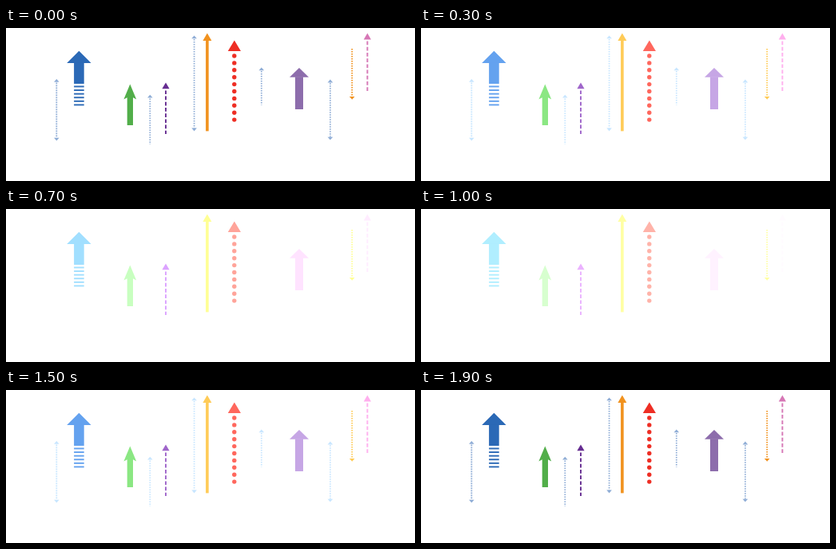
Write an HTML page with a canvas that moves like this. It is 512x192 px and loops after 2 s.

```html
<!DOCTYPE html>
<html lang="en">
<head>
<meta charset="utf-8">
<title>Glowing arrows</title>
<style>
  html, body { margin: 0; width: 100%; height: 100%; overflow: hidden; background: #fff; }
  canvas { display: block; }
</style>
</head>
<body>
<canvas id="stage" width="512" height="192"></canvas>
<script>
const ctx = document.getElementById('stage').getContext('2d');

const STEP = 100, STEPS = 20, PEAK = 9;
const BLUE = [43, 105, 182], SKY = [143, 173, 214], GREEN = [82, 174, 74],
      VIOLET = [102, 45, 145], ORANGE = [241, 146, 30], RED = [238, 46, 36],
      MAUVE = [141, 109, 172], PINK = [214, 118, 181];

let lift = 0;

function setColor(base) {
  const color = `rgb(${base.map(c => Math.min(255, Math.round(c + lift)))})`;
  ctx.fillStyle = ctx.strokeStyle = color;
}

function polygon(...points) {
  ctx.beginPath();
  points.forEach(([x, y]) => ctx.lineTo(x, y));
  ctx.fill();
}

// A triangle from its tip; a negative height points down.
function head(x, tip, width, height) {
  polygon([x, tip], [x + width / 2, tip + height], [x - width / 2, tip + height]);
}

function line(x, top, bottom, width, dash = []) {
  ctx.lineWidth = width;
  ctx.setLineDash(dash);
  ctx.beginPath();
  ctx.moveTo(x, top);
  ctx.lineTo(x, bottom);
  ctx.stroke();
}

function dottedArrow(color, x, top, bottom, up, down) {
  setColor(color);
  line(x, up ? top + 4.6 : top, down ? bottom - 4 : bottom, 1.8, [1.6, 1.4]);
  if (up) head(x, top, 6.6, 3.8);
  if (down) head(x, bottom, 6.6, -3.8);
}

function dashedArrow(color, x, top, bottom) {
  setColor(color);
  head(x, top, 9.2, 7.8);
  line(x, top + 10, bottom, 1.9, [4.7, 2.5]);
}

function blockArrow(color, x, top, neck, bottom, width, shaft) {
  setColor(color);
  head(x, top, width, neck - top);
  ctx.fillRect(x - shaft / 2, neck - 0.5, shaft, bottom - neck + 0.5);
}

function draw() {
  ctx.clearRect(0, 0, 512, 192);

  dottedArrow(SKY, 63.3, 64, 141.6, true, true);
  dottedArrow(SKY, 180.3, 83.8, 146, true, false);
  dottedArrow(SKY, 235.6, 9.4, 129.4, true, true);
  dottedArrow(SKY, 319.8, 49.4, 96.4, true, false);
  dottedArrow(SKY, 405.9, 64.6, 140.6, true, true);
  dottedArrow(ORANGE, 433.2, 26, 89.8, false, true);

  blockArrow(BLUE, 91.4, 28.8, 44, 70, 30.4, 12.6);
  for (let i = 0; i < 6; i++) ctx.fillRect(85.1, 72.5 + i * 4.6, 12.6, 1.9);

  setColor(GREEN);
  polygon([155.3, 70.4], [163.2, 89.4], [159, 87.2], [159, 122],
          [151.7, 122], [151.7, 87.2], [147.4, 89.4]);

  dashedArrow(VIOLET, 200, 68.4, 133);
  dashedArrow(PINK, 452.4, 6.6, 81);

  blockArrow(ORANGE, 251.9, 6.6, 16, 129.4, 11, 3.6);
  blockArrow(MAUVE, 367, 50, 61.8, 102, 24, 10);

  setColor(RED);
  head(285.9, 15.4, 16.2, 13.7);
  for (let i = 0; i < 10; i++) {
    ctx.beginPath();
    ctx.arc(285.8, 35 + i * 8.9, 2.7, 0, 2 * Math.PI);
    ctx.fill();
  }
}

// Colours brighten stepwise up to the peak, fade back, then rest for a step.
function tick() {
  const step = Math.floor(performance.now() / STEP) % STEPS;
  const level = Math.max(0, PEAK - Math.abs(step - PEAK));
  lift = level ? 11 + level * 15.3 : 0;
  draw();
  requestAnimationFrame(tick);
}
tick();
</script>
</body>
</html>
```
